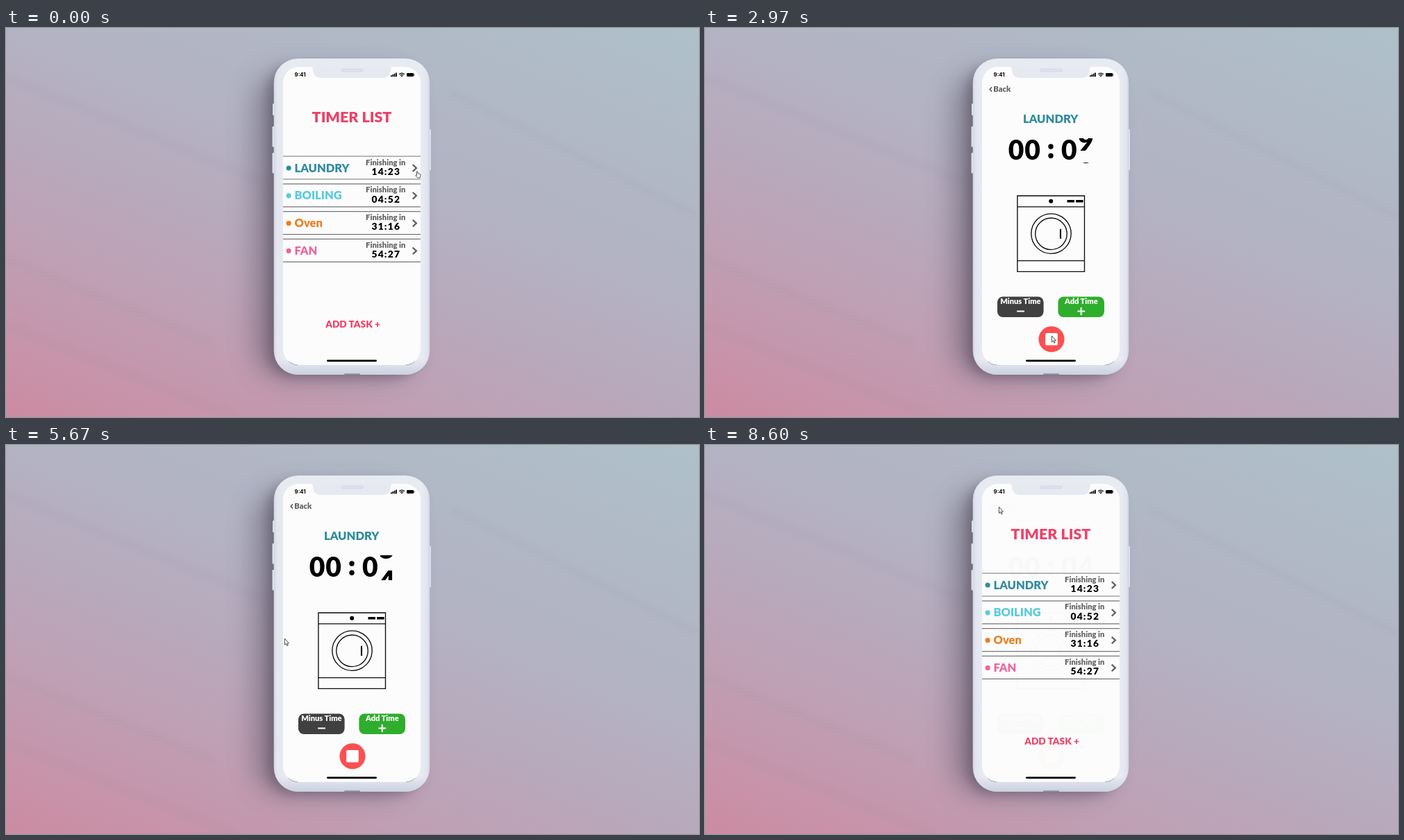
An HTML page that plays this animation: 998 by 561 pixels, repeating every 8630 ms.

```html
<!DOCTYPE html>
<html lang="en">
<head>
<meta charset="utf-8">
<title>Timer list</title>
<style>
html, body { margin: 0; width: 100%; height: 100%; overflow: hidden; }
svg { display: block; width: 100vw; height: 100vh; }
text { font-family: Lato, "Open Sans", sans-serif; font-weight: 900; }
.mid { text-anchor: middle; }
.status { font: 700 7.8px Inter, "Liberation Sans", sans-serif; }
</style>
</head>
<body>
<svg viewBox="0 0 998 561" preserveAspectRatio="none">
  <defs>
    <linearGradient id="sky" gradientUnits="userSpaceOnUse" x1="998" y1="0" x2="667" y2="828">
      <stop offset="0" stop-color="#aec0c9"/>
      <stop offset=".42" stop-color="#b3b2c3"/>
      <stop offset=".58" stop-color="#b8a9bc"/>
      <stop offset=".76" stop-color="#c09eb3"/>
      <stop offset="1" stop-color="#cc8ba1"/>
    </linearGradient>
    <linearGradient id="shell" x1="0" y1="0" x2="1" y2="0">
      <stop offset="0" stop-color="#d3d7e3"/>
      <stop offset=".02" stop-color="#e3e6ef"/>
      <stop offset=".06" stop-color="#e8eaf2"/>
      <stop offset=".95" stop-color="#e9ebf2"/>
      <stop offset=".985" stop-color="#e1e4ee"/>
      <stop offset="1" stop-color="#d0d4e1"/>
    </linearGradient>
    <linearGradient id="foot" x1="0" y1="0" x2="0" y2="1">
      <stop offset=".95" stop-color="#cbd1e0" stop-opacity="0"/>
      <stop offset="1" stop-color="#cbd1e0"/>
    </linearGradient>
    <filter id="soft" x="-50%" y="-30%" width="200%" height="160%"><feGaussianBlur stdDeviation="20"/></filter>
    <filter id="near" x="-20%" y="-20%" width="140%" height="140%"><feGaussianBlur stdDeviation="8"/></filter>
    <filter id="haze"><feGaussianBlur stdDeviation="3"/></filter>
    <clipPath id="screen"><rect x="399" y="56" width="198" height="430" rx="23"/></clipPath>
    <clipPath id="slot"><rect x="534" y="159" width="29" height="36"/></clipPath>
  </defs>

  <rect width="998" height="561" fill="url(#sky)"/>
  <path d="M640 92L998 272M0 333L300 455M0 428L330 561M0 70L380 225" fill="none"
    stroke="#6f7190" stroke-opacity=".05" stroke-width="9" filter="url(#haze)"/>

  <rect x="358" y="66" width="222" height="436" rx="40" fill="#4c4555" opacity=".46" filter="url(#soft)"/>
  <rect x="377" y="54" width="222" height="450" rx="36" fill="#4c4555" opacity=".4" filter="url(#near)"/>

  <g fill="#dde1eb">
    <rect x="384" y="109" width="4" height="17" rx="1"/>
    <rect x="383.5" y="142" width="4" height="29.5" rx="1"/>
    <rect x="383.5" y="180" width="4" height="29.5" rx="1"/>
    <rect x="608.5" y="146" width="3.5" height="59" rx="1"/>
  </g>
  <rect x="385.7" y="44" width="224.6" height="456" rx="35" fill="url(#shell)"/>
  <rect x="385.7" y="44" width="224.6" height="456" rx="35" fill="url(#foot)"/>
  <rect x="487" y="498.3" width="23" height="1.7" rx=".8" fill="#8d91a3"/>

  <g clip-path="url(#screen)">
    <rect x="399" y="56" width="198" height="430" fill="#fcfcfc"/>
    <g id="list">
      <text id="title" class="mid" x="498" y="136.3" font-size="21.5" fill="#ef3f67">TIMER LIST</text>
      <g id="rows"></g>
      <text class="mid" x="499.6" y="432" font-size="13.7" fill="#ef3f67">ADD TASK +</text>
    </g>
    <g id="detail">
      <rect x="399" y="56" width="198" height="430" fill="#fcfcfc"/>
      <path d="M413 85.2L410.2 88.4L413 91.6" fill="none" stroke="#606060" stroke-width="1.7"/>
      <text x="415.3" y="92" font-size="11.2" fill="#606060">Back</text>
      <text id="name" class="mid" x="497.7" y="137.3" font-size="16.6" fill="#2e8b9e">LAUNDRY</text>
      <g class="mid" font-size="39">
        <text x="448" y="190.3">0</text>
        <text x="471.6" y="190.3">0</text>
        <text x="524.2" y="190.3">0</text>
        <g clip-path="url(#slot)"><g id="strip"></g></g>
      </g>
      <circle cx="498" cy="171" r="3.7"/>
      <circle cx="498" cy="184.3" r="3.7"/>

      <g fill="none" stroke="#0a0a0a" stroke-width="1.35">
        <path d="M449.9 242H546.5V351.4H449.9ZM449.9 257.8H546.5M449.9 335.6H546.5"/>
        <circle cx="498.5" cy="296.6" r="28.7"/>
        <circle cx="498.5" cy="296.8" r="22.8"/>
        <path d="M512 289.8V304" stroke-width="2.1"/>
      </g>
      <circle cx="498.2" cy="249.8" r="3"/>
      <path d="M521.5 248H532V251.6H521.5ZM534 248H544.6V251.6H534Z"/>

      <rect x="421" y="387.5" width="66.6" height="29.5" rx="8" fill="#404041"/>
      <rect x="508.4" y="387.5" width="66.6" height="29.5" rx="8" fill="#2fad2c"/>
      <g class="mid" fill="#fff" font-size="11.1">
        <text x="454.4" y="397.8">Minus Time</text>
        <text x="541.8" y="397.8">Add Time</text>
      </g>
      <path d="M449.2 408.5H460M536.4 408.5H547.2M541.8 403.1V413.9" stroke="#fff" stroke-width="2.2"/>
      <circle cx="499" cy="448.8" r="18.6" fill="#fb5052"/>
      <rect x="490.2" y="440" width="17.6" height="17.6" rx="1.6" fill="#fff"/>
    </g>
    <rect x="462" y="478.4" width="72" height="2.9" rx="1.45"/>
    <path d="M438 55Q442 56 442 60Q442.5 72 454 72H542Q553.5 72 554 60Q554 56 558 55Z" fill="#e7e9f1"/>
  </g>
  <path d="M407 480.5Q412 485.5 420 485.9M589 480.5Q584 485.5 576 485.9" fill="none" stroke="#8a8a92" stroke-width=".7"/>

  <rect x="483" y="59.2" width="31" height="3.6" rx="1.8" fill="#dfe2eb" stroke="#cbd0dd" stroke-width=".7"/>
  <text class="status" x="415.6" y="70.2">9:41</text>
  <path d="M554 68.2h1.7v2h-1.7zM556.4 67.1h1.7v3.1h-1.7zM558.8 65.8h1.7v4.4h-1.7zM561.2 64.5h1.7v5.7h-1.7z"/>
  <path d="M566.2 66.7Q570 63.4 573.8 66.7M567.7 68.4Q570 66.5 572.3 68.4" fill="none" stroke="#000" stroke-width="1.2"/>
  <circle cx="570" cy="69.6" r=".9"/>
  <rect x="577" y="64.9" width="10.2" height="5.2" rx="1.4"/>
  <rect x="587.6" y="66.5" width=".8" height="2" rx=".4"/>

  <g id="cursor" fill="#fff" stroke="#30303a" stroke-width=".85" stroke-linejoin="round">
    <path id="arrow" d="M.4 .3V9.4L2.4 7.6L3.8 10.7L5.2 10.1L3.8 7.1H6.4Z"/>
    <path id="hand" d="M2.2 1.2Q3.1 .2 3.8 1.3L4.3 4L6.2 4.1L7.7 4.9Q8.2 7.4 7.1 10H3.7L.7 6.9Q.8 5.7 2.6 6.6Z"/>
  </g>
</svg>
<script>
const LOOP = 8630, OPEN = 437, COUNT = 2870, CLOSE = 7970, FADE = 850;
const PITCH = 46;
const el = id => document.getElementById(id);
const clamp = x => Math.min(1, Math.max(0, x));
const easeOut = x => 1 - (1 - clamp(x)) ** 3;

const tasks = [
  ["LAUNDRY", "14:23", "#2e8b9e"],
  ["BOILING", "04:52", "#58cbdd"],
  ["Oven", "31:16", "#ed7d1f"],
  ["FAN", "54:27", "#ee649c"]
];
el("rows").innerHTML = tasks.map(([name, left, color], i) => `
  <g transform="translate(0 ${i * 39.8})">
    <path d="M399 185H597M399 218H597" stroke="#75757a" stroke-width="1.15"/>
    <circle cx="407.1" cy="202" r="3.6" fill="${color}"/>
    <text x="415.5" y="207.5" font-size="16.5" fill="${color}">${name}</text>
    <text class="mid" x="546.8" y="197.7" font-size="11.2" fill="#626266">Finishing in</text>
    <text class="mid" x="547.3" y="211.8" font-size="13.8" letter-spacing="1.2">${left}</text>
    <path d="M585.8 197.2L590.9 202L585.8 206.8" fill="none" stroke="#606065" stroke-width="2.3"/>
  </g>`).join("");

el("strip").innerHTML = [9, 8, 7, 6, 5, 4].map((n, i) =>
  `<text x="548.6" y="${190.3 + i * PITCH}">${n}</text>`).join("");

// time, x, y of the pointer
const path = [
  [0, 589, 206], [440, 588, 206], [570, 582, 206], [900, 582, 212],
  [1630, 528, 323], [1770, 518, 345], [2200, 503, 452], [2870, 503, 452],
  [3400, 482, 408], [3770, 478, 399], [4300, 440, 388], [4670, 424, 372],
  [5530, 418, 306], [5670, 401, 279], [6050, 399, 222], [6450, 405, 150],
  [7080, 422, 92], [7480, 422, 92], [7630, 422, 85.5], [7830, 424, 86],
  [8050, 424, 86], [8200, 423, 89], [LOOP, 423, 89]
];

function pointAt(t) {
  const i = Math.max(1, path.findIndex(p => p[0] >= t));
  const [t0, x0, y0] = path[i - 1], [t1, x1, y1] = path[i];
  const k = (t - t0) / (t1 - t0);
  return [x0 + (x1 - x0) * k, y0 + (y1 - y0) * k];
}

function draw(t) {
  const shown = t < CLOSE ? easeOut((t - OPEN) / FADE) : 1 - easeOut((t - CLOSE) / FADE);
  el("detail").setAttribute("opacity", shown);
  el("title").setAttribute("transform", `translate(0 ${-2.5 * shown})`);
  el("name").setAttribute("transform", `translate(0 ${5 * (1 - shown)})`);

  const roll = 5 * PITCH * easeOut((t - COUNT) / 5000);
  el("strip").setAttribute("transform", `translate(0 ${-roll})`);

  const [x, y] = pointAt(t);
  const hand = t < 490 || (t >= 7830 && t < 8150);
  el("cursor").setAttribute("transform", `translate(${x} ${y})`);
  el("hand").setAttribute("display", hand ? "inline" : "none");
  el("arrow").setAttribute("display", hand ? "none" : "inline");
}

const start = performance.now();
function tick() {
  draw((performance.now() - start) % LOOP);
  requestAnimationFrame(tick);
}
tick();
</script>
</body>
</html>
```
